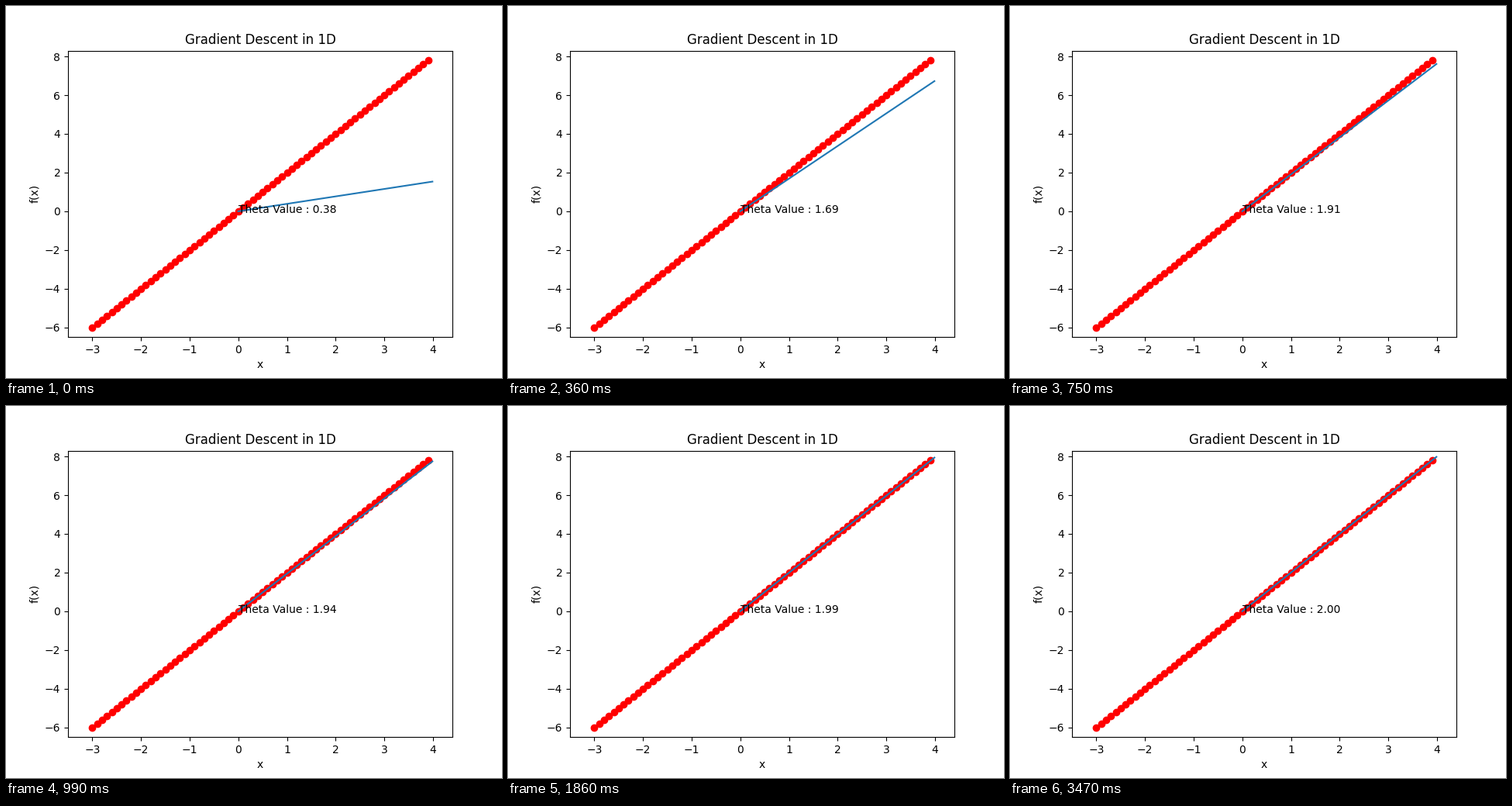
A matplotlib script that plays this animation: 640 by 480 pixels, repeating every 8000 ms.

```python
import numpy as np
import matplotlib.pyplot as plt
from matplotlib.animation import FuncAnimation

LOOP_MS, TICK_MS, STEP_MS = 8000, 20, 30
SLOPE = 2.0

# (step, error of theta): exponential decay between these points, then rest.
DECAY = [(0, 1.6156), (5, 0.76), (19, 0.13), (33, 0.059), (116, 3.5e-4)]
STEPS, ERRORS = zip(*DECAY)


def theta_at(step):
    return SLOPE - np.exp(np.interp(step, STEPS, np.log(ERRORS)))


fig, ax = plt.subplots(figsize=(6.4, 4.8), dpi=100)
x = np.arange(-30, 40) / 10
y = SLOPE * x
ax.scatter(x, y, c="red")
ax.set_xlim(x.min() - 0.5, x.max() + 0.5)
ax.set_ylim(y.min() - 0.5, y.max() + 0.5)
ax.set_title("Gradient Descent in 1D")
ax.set_xlabel("x")
ax.set_ylabel("f(x)")

fit_x = np.array([0, 3.99])
fit, = ax.plot(fit_x, fit_x)
label = ax.text(0, -0.1, "")


def update(i):
    step = (i * TICK_MS + TICK_MS // 2) // STEP_MS
    theta = theta_at(step)
    fit.set_data(fit_x, theta * fit_x)
    label.set_text(f"Theta Value : {theta:.2f}")
    return fit, label


anim = FuncAnimation(fig, update, frames=LOOP_MS // TICK_MS, interval=TICK_MS,
                     repeat=True, repeat_delay=0)
plt.show()
```
